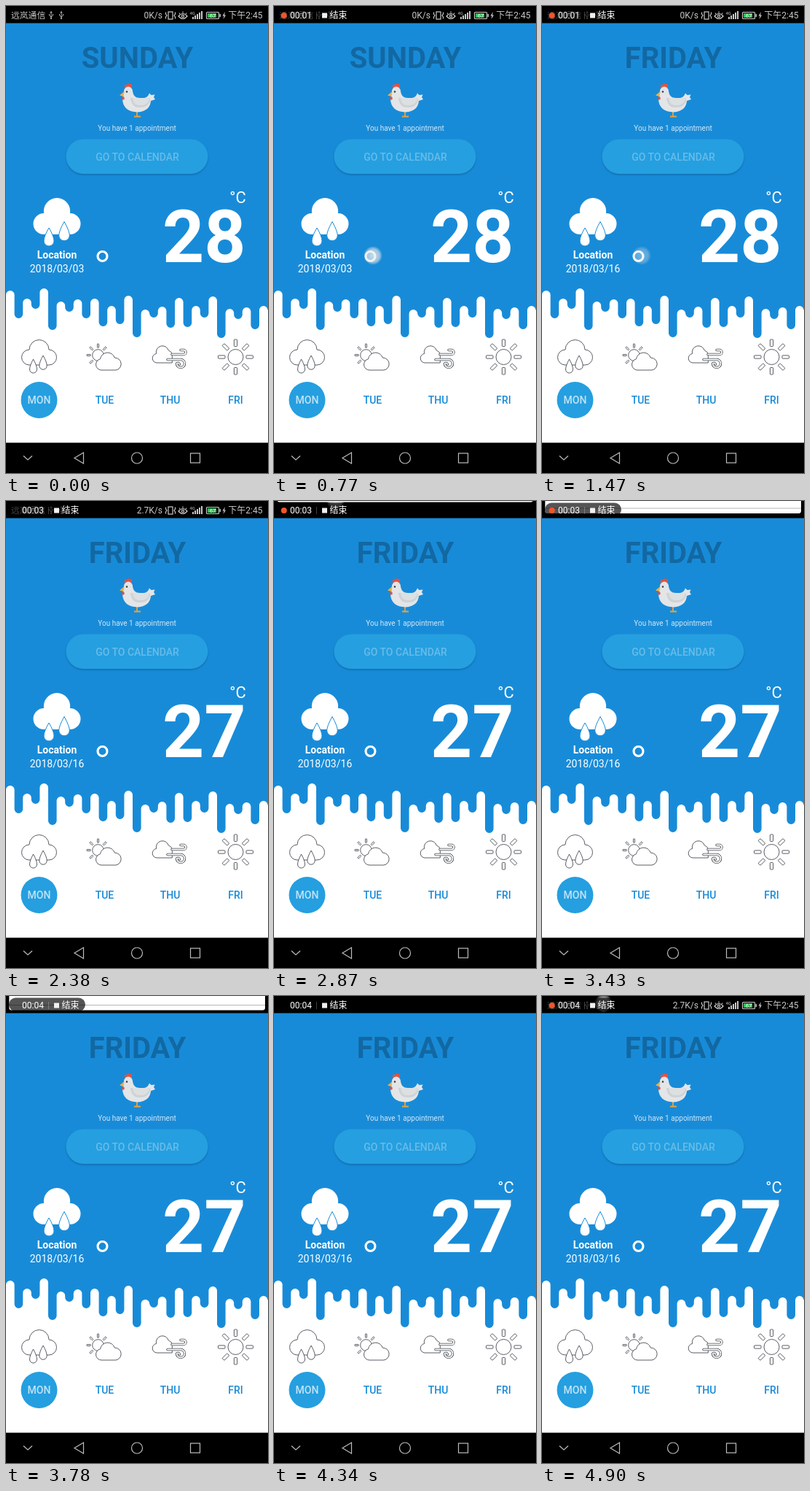
Recreate the animation shown at these times as an HTML page. Size 360 by 640 pixels, loop 5.04 s.

```html
<!DOCTYPE html>
<html lang="en">
<head>
<meta charset="utf-8">
<title>Weather</title>
<style>
  html, body { margin: 0; width: 100%; height: 100%; overflow: hidden; background: #000; }
  svg { display: block; width: 360px; height: 640px; }
  text { font-family: Roboto, "Noto Sans CJK SC", "Noto Sans CJK", sans-serif; white-space: pre; }
  .mid { text-anchor: middle; }
  .end { text-anchor: end; }
  .bold { font-weight: 700; }
  .line { fill: #fff; stroke: #3c4248; stroke-width: .85; stroke-linejoin: round; }
  .nav { fill: none; stroke: #bcbcbc; stroke-width: 1.2; }
</style>
</head>
<body>
<svg viewBox="0 0 360 640">
  <defs>
    <radialGradient id="glow">
      <stop offset="0" stop-color="#f0f0f0" stop-opacity=".8"/>
      <stop offset=".7" stop-color="#e6e6e6" stop-opacity=".64"/>
      <stop offset=".86" stop-color="#ddd" stop-opacity=".4"/>
      <stop offset="1" stop-color="#ddd" stop-opacity=".12"/>
    </radialGradient>
    <filter id="soft" x="-10%" y="-30%" width="120%" height="160%"><feGaussianBlur stdDeviation="1.2"/></filter>
  </defs>

  <rect width="360" height="640"/>
  <rect y="100" width="360" height="498.500" fill="#fff"/>
  <path id="drips" fill="#188bd8"/>

  <text id="day" class="mid bold" x="180.500" y="85" font-size="40" fill="#000" fill-opacity=".25"></text>

  <g id="hen">
    <path d="M163 112q-1-6 3-4q2-3 4-1q4-1 3 3l0 4h-9z" fill="#e8503f"/>
    <path d="M180 144v7.500m-4 0h9" fill="none" stroke="#e9a43b" stroke-width="1.800"/>
    <path d="M162 117a6 6.500 0 0 1 12 0C175 123 178 126 184 126H190Q195 125 197 119.500L199.500 122L204.500 121.500L203 125L205 128L199 130Q198 144 181 145.500Q161 145 160 128Z" fill="#e3e5e7"/>
    <path d="M171 126h24q4 0 3 4q-3 9-13 9h-4q-9-1-10-13z" fill="#cfd3d6"/>
    <path d="M174 126h21q3 1 1 4q-3 6-11 6h-3q-7-1-8-10z" fill="#dde0e2"/>
    <path d="M162.500 117l-6.500 5.500l5.500 1.500z" fill="#f0b23e"/>
    <path d="M160 124q3.500 0 2.500 4q-2.500 2-3-1z" fill="#e8503f"/>
    <circle cx="166" cy="117.500" r="1.200" fill="#333"/>
  </g>

  <text class="mid" x="180" y="171" font-size="10" fill="#fff" fill-opacity=".8">You have 1 appointment</text>

  <rect x="82.500" y="184" width="195" height="47.500" rx="23.700" fill="#0b4f84" opacity=".5" filter="url(#soft)"/>
  <rect x="82.500" y="182.500" width="195" height="47.500" rx="23.700" fill="#259fe0"/>
  <text class="mid" x="180.500" y="212" font-size="14" font-weight="500" fill="#fff" fill-opacity=".3">GO TO CALENDAR</text>

  <text class="end" x="329.800" y="270" font-size="22" fill="#fff">°C</text>
  <text id="temp" class="mid bold" x="272.300" y="351.300" font-size="100" fill="#fff"></text>

  <g fill="#fff">
    <path d="M52 313a14.500 14.500 0 0 1 0-29a18.200 18.200 0 1 1 36 0a14.500 14.500 0 0 1 0 29z"/>
    <g stroke="#188bd8" stroke-width="1">
      <path d="M59 304q7 12 7 18a7 7 0 0 1-14 0q0-6 7-18z"/>
      <path d="M80 295.500q7.300 13 7.300 19a7.300 7.300 0 0 1-14.600 0q0-6 7.300-19z"/>
    </g>
    <text class="mid bold" x="70" y="346" font-size="14">Location</text>
    <text id="date" class="mid" x="70" y="365" font-size="14"></text>
  </g>
  <circle cx="132.500" cy="343" r="6.500" fill="none" stroke="#fff" stroke-width="3.100"/>

  <g class="line">
    <path d="M32 492a10.500 10.500 0 0 1 0-21a13.500 13.500 0 0 1 27 0a10.500 10.500 0 0 1 0 21z"/>
    <path d="M37.500 484q5 9 5 14a5 5 0 0 1-10 0q0-5 5-14z"/>
    <path d="M51 479q5.200 9 5.200 14a5.200 5.200 0 0 1-10.400 0q0-5 5.200-14z"/>

    <g id="smallRays"></g>
    <circle cx="126.500" cy="478.500" r="7.800"/>
    <path d="M131 499a7.700 7.700 0 0 1-1.500-15.200a10.200 10.200 0 0 1 19.800-1.700a8.500 8.500 0 0 1 1.600 16.900z"/>

    <path d="M207 489a6.300 6.300 0 0 1-.5-12.500a8.700 8.700 0 0 1 16.800-4.500a7 7 0 0 1 5 5.500v11.500z"/>
    <circle cx="315.500" cy="481" r="10.500"/>
    <g id="bigRays"></g>
  </g>
  <g id="wind" fill="none" stroke-linecap="round"></g>

  <circle cx="45.500" cy="540" r="25" fill="#259fe0"/>
  <g id="week" class="mid" font-size="14" font-weight="500"></g>

  <g class="nav">
    <path d="M24 616.500l6 5.500l6-5.500"/>
    <path d="M94 619.500l12.500-7.500v15z"/>
    <circle cx="180" cy="619.500" r="7.500"/>
    <rect x="253.500" y="613" width="13" height="13"/>
  </g>

  <g id="status" fill="#c8c8c8" font-size="12">
    <text x="7" y="17" font-size="11.800">远岚通信</text>
    <g id="plugs" fill="none" stroke="#c8c8c8" stroke-width=".9"></g>
    <text id="speed" class="end" x="215" y="17"></text>
    <g fill="none" stroke="#c8c8c8" stroke-width="1.200">
      <rect x="223" y="8" width="6" height="10"/>
      <path d="M219.500 8.500v2.500l1.500 2l-1.500 2v2.500M232.500 8.500v2.500l-1.500 2l1.500 2v2.500"/>
      <path d="M237 14q6-7 12 0q-6 7-12 0zM238 9.500l1 1.500M243 7.500v2M248 9.500l-1 1.500"/>
      <circle cx="243" cy="14" r="1.600"/>
      <rect x="275.500" y="8.500" width="17" height="9" rx="1"/>
    </g>
    <text x="252.500" y="12" font-size="6">4G</text>
    <path d="M256 18v-3h2v3zM259 18v-5h2v5zM262 18v-7h2v7zM265 18v-9h2v9zM268 18v-11h2v11zM293.500 11h1.500v4h-1.500zM301 8l-3.500 5.500h2l-1 4.500l3.500-5.500h-2z"/>
    <rect x="277" y="10" width="12" height="6" fill="#2fbc50"/>
    <text class="mid" x="284" y="16" font-size="7.500" fill="#fff">67</text>
    <text class="end" x="352.500" y="17">下午2:45</text>
  </g>

  <g id="shade">
    <rect x="4.300" y="-30" width="351.700" height="29.500" rx="3.500" fill="#fff"/>
    <path d="M4.300-7.500h351.700" stroke="#b5b5b5"/>
  </g>
  <circle id="touchTop" cx="84.500" r="12" fill="url(#glow)"/>

  <g id="pill">
    <rect x="4" y="2.500" width="105" height="18.500" rx="9.200" fill="#000" fill-opacity=".67"/>
    <circle id="dot" cx="13.700" cy="13" r="4" fill="#f2552c"/>
    <text id="clock" x="22" y="17" font-size="12" fill="#fff"></text>
    <path d="M58.500 8v10" stroke="#fff" stroke-opacity=".25"/>
    <rect x="66" y="9.500" width="7" height="7" fill="#f0f0f0"/>
    <text x="76.500" y="17" font-size="12" fill="#fff">结束</text>
  </g>
  <circle id="touch" cx="136" cy="342" r="12.500" fill="url(#glow)"/>
</svg>

<script>
const LOOP = 5040, STEP = 70;
const el = id => document.getElementById(id);
const set = (id, name, value) => el(id).setAttribute(name, value);

// Drip edge: white tops and blue tips alternate across the width.
const tops = [390, 401, 387, 405, 402, 401, 411, 397, 416, 412, 400, 411, 398, 415, 413, 411];
const tips = [428, 415, 444, 419, 428, 439, 436, 454, 427, 441, 440, 427, 455, 429, 443];
const R = 5.8;
let edge = 'M0 23.5V' + (tops[0] + R);
tops.forEach((top, i) => {
  const x = i * 4 * R;
  edge += `V${top + R}A${R} ${R} 0 0 1 ${x + 2 * R} ${top + R}`;
  if (i < tips.length) edge += `V${tips[i] - R}A${R} ${R} 0 0 0 ${x + 4 * R} ${tips[i] - R}`;
});
set('drips', 'd', edge + 'H360V23.5Z');

function rays(id, cx, cy, near, len, width, angles) {
  el(id).innerHTML = angles.map(a =>
    `<rect x="${cx - width / 2}" y="${cy - near - len}" width="${width}" height="${len}" rx="${width * .2}" transform="rotate(${a} ${cx} ${cy})"/>`
  ).join('');
}
rays('bigRays', 315.5, 481, 14.5, 9.5, 4.2, [0, 45, 90, 135, 180, 225, 270, 315]);
rays('smallRays', 126.5, 478.5, 10.3, 5.2, 2, [0, 45, 225, 270, 315]);

// Hollow strands: a dark stroke with a thinner white one on top.
const strands = [
  'M228 477.500H244a3 3 0 0 0 0-6H240',
  'M222 484.500H240a5.500 5.500 0 1 1-5.500 5.500a2.500 2.500 0 0 1 4 1'
];
el('wind').innerHTML = strands.map(d =>
  `<path d="${d}" stroke="#3c4248" stroke-width="3.400"/><path d="${d}" stroke="#fff" stroke-width="1.800"/>`
).join('');

el('week').innerHTML = ['MON', 'TUE', 'THU', 'FRI'].map((name, i) =>
  `<text x="${45.5 + i * 90}" y="545" fill="${i ? '#188bd8' : '#c0e3f6'}">${name}</text>`
).join('');

el('plugs').innerHTML = [62, 76].map(x =>
  `<path d="M${x} 8v9M${x - 2.5} 11v2l2.500 2l2.500-2v-2M${x - 1.2} 9.500l1.200-2l1.200 2"/><circle cx="${x}" cy="17" r=".8"/>`
).join('');

// Linear between [time, value] stops.
function ramp(t, stops) {
  let [t0, v0] = stops[0];
  for (const [t1, v1] of stops) {
    if (t < t1) return t1 > t0 ? v0 + (v1 - v0) * (t - t0) / (t1 - t0) : v0;
    [t0, v0] = [t1, v1];
  }
  return v0;
}
// Latest value whose time has come.
const hold = (t, stops) => stops.reduce((v, s) => t >= s[0] ? s[1] : v, stops[0][1]);

const fades = {
  pill: [[0, 0], [210, 1]],
  dot: [[210, 0], [490, 1], [1750, 1], [2100, 0], [2380, 0], [2730, 1], [3430, 1], [3710, 0], [4340, 0], [4690, 1]],
  touch: [[630, 0], [770, 1], [1190, 1], [1750, 0]],
  touchTop: [[2590, 0], [2730, 1], [3290, 1], [3430, 0], [4899, 0], [4900, 1]],
  status: [[2590, 1], [2870, 0], [4340, 0], [4620, 1]]
};
const texts = {
  day: [[0, 'SUNDAY'], [1260, 'FRIDAY']],
  date: [[0, '2018/03/03'], [1260, '2018/03/16']],
  temp: [[0, '28'], [1960, '27']],
  speed: [[0, '0K/s'], [2030, '2.7K/s']],
  clock: [[0, '00:00'], [630, '00:01'], [1750, '00:02'], [2240, '00:03'], [3500, '00:04']]
};
const shadeDrop = [[2800, 0], [3150, 10], [3360, 17], [3780, 20], [3900, 20], [3990, -2]];

function draw(t) {
  for (const id in fades) set(id, 'opacity', ramp(t, fades[id]));
  for (const id in texts) {
    const value = hold(t, texts[id]);
    if (el(id).textContent !== value) el(id).textContent = value;
  }
  set('shade', 'transform', `translate(0 ${ramp(t, shadeDrop)})`);
  set('touchTop', 'cy', t < 4000 ? 0 : 10);
  set('touch', 'cx', ramp(t, [[0, 136], [1190, 136], [1470, 137]]));
}

const start = performance.now();
function tick() {
  const t = (performance.now() - start) % LOOP;
  draw(Math.floor(t / STEP) * STEP);
  requestAnimationFrame(tick);
}
tick();
</script>
</body>
</html>
```
